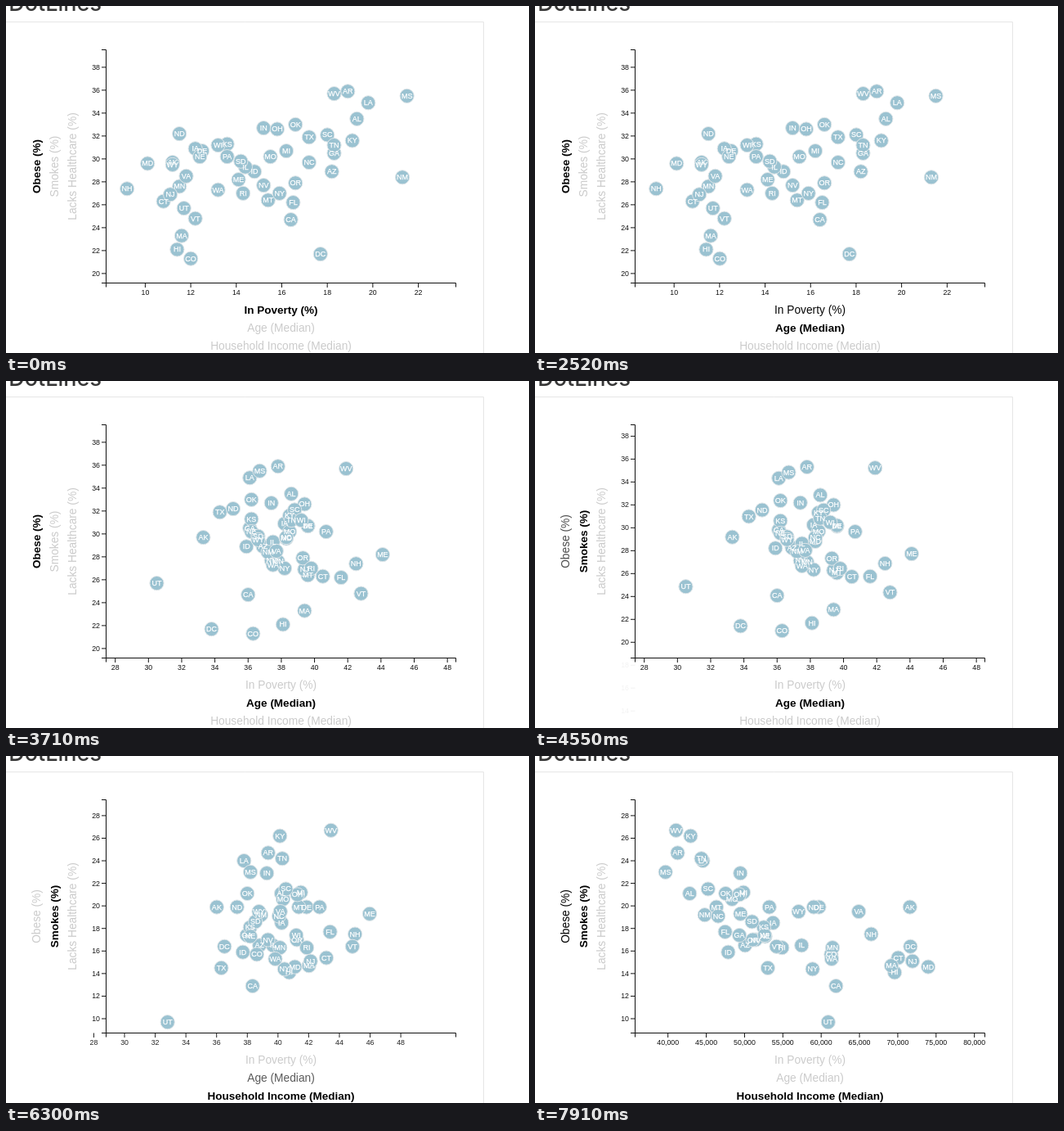
These frames come from a looping animation (640 by 424 pixels, 8 s). An HTML page with a canvas:

```html
<!DOCTYPE html>
<html lang="en">
<head>
<meta charset="utf-8">
<style>
  html, body { margin: 0; width: 100%; height: 100%; overflow: hidden; background: #fff; }
  canvas { display: block; }
</style>
</head>
<body>
<canvas id="stage" width="640" height="424"></canvas>
<script>
const ctx = document.getElementById('stage').getContext('2d');
const LOOP = 8000, TICK = 70, FADE = 300;
const LEFT = 122.5, RIGHT = 550.5, TOP = 54, BOTTOM = 338.5;
const SANS = '"Liberation Sans", Arial, sans-serif';

const states = ('AL AK AZ AR CA CO CT DE DC FL GA HI ID IL IN IA KS KY LA ME MD MA MI MN MS MO ' +
  'MT NE NV NH NJ NM NY NC ND OH OK OR PA RI SC SD TN TX UT VT VA WA WV WI WY').split(' ');

const poverty = [19.3, 11.2, 18.2, 18.9, 16.4, 12, 10.8, 12.5, 17.7, 16.5, 18.3, 11.4, 14.8, 14.4, 15.2, 12.2, 13.6,
  19.1, 19.8, 14.1, 10.1, 11.6, 16.2, 11.5, 21.5, 15.5, 15.4, 12.4, 15.2, 9.2, 11.1, 21.3, 15.9, 17.2,
  11.5, 15.8, 16.6, 16.6, 13.6, 14.3, 18, 14.2, 18.3, 17.2, 11.7, 12.2, 11.8, 13.2, 18.3, 13.2, 11.2];
const age = [38.6, 33.3, 36.9, 37.8, 36, 36.3, 40.5, 39.6, 33.8, 41.6, 36.1, 38.1, 35.9, 37.5, 37.4, 38.2, 36.2,
  38.5, 36.1, 44.1, 38.3, 39.4, 39.6, 37.8, 36.7, 38.5, 39.6, 36.2, 37.4, 42.5, 39.4, 37.2, 38.2, 38.3,
  35.1, 39.4, 36.2, 39.3, 40.7, 39.8, 38.8, 36.6, 38.6, 34.3, 30.5, 42.8, 37.7, 37.5, 41.9, 39.2, 36.6];
const income = [42830, 71583, 50068, 41262, 61933, 61303, 70048, 59716, 71648, 47463, 49321, 69592, 47861, 57444, 49446, 53712, 52504,
  42958, 44555, 49462, 73971, 69160, 49847, 61481, 39680, 48363, 46328, 52686, 51450, 66532, 71919, 44803, 58878, 46556,
  59029, 49308, 47529, 51075, 53234, 54891, 45238, 50979, 44361, 53035, 60922, 54166, 64902, 61366, 41059, 52622, 57055];
const obesity = [33.5, 29.7, 28.9, 35.9, 24.7, 21.3, 26.3, 30.7, 21.7, 26.2, 30.5, 22.1, 28.9, 29.3, 32.7, 30.9, 31.3,
  31.6, 34.9, 28.2, 29.6, 23.3, 30.7, 27.6, 35.5, 30.2, 26.4, 30.2, 27.7, 27.4, 26.9, 28.4, 27, 29.7,
  32.2, 32.6, 33, 27.9, 30.2, 27, 32.1, 29.8, 31.2, 31.9, 25.7, 24.8, 28.5, 27.3, 35.7, 31.2, 29.5];
const smokes = [21.1, 19.9, 16.5, 24.7, 12.9, 15.7, 15.4, 19.9, 16.4, 17.7, 17.4, 14.1, 15.9, 16.5, 22.9, 18.5, 18.1,
  26.2, 24, 19.3, 14.6, 14.7, 21.2, 16.3, 23, 20.6, 19.9, 17.3, 17, 17.5, 15.1, 19.2, 14.4, 19.1,
  19.9, 21, 21.1, 17, 19.9, 16.3, 21.5, 18.6, 24.2, 14.5, 9.7, 16.4, 19.5, 15.3, 26.7, 17.4, 19.5];

function makeScale(data, start, end, step) {
  const low = Math.min(...data) * 0.9, high = Math.max(...data) * 1.1;
  const ticks = [];
  for (let v = Math.ceil(low / step) * step; v <= high; v += step) ticks.push(v);
  return { data, ticks, at: v => start + (v - low) / (high - low) * (end - start) };
}
const xScales = [makeScale(poverty, LEFT, RIGHT, 2), makeScale(age, LEFT, RIGHT, 2), makeScale(income, LEFT, RIGHT, 5000)];
const yScales = [makeScale(obesity, BOTTOM, TOP, 2), makeScale(smokes, BOTTOM, TOP, 2)];
const xClicks = [2505, 6220], yClicks = [4479];

// "dark" and "light" hold the moments a label starts fading to black or to grey
const xLabels = [
  { text: 'In Poverty (%)', initial: 1, dark: [], light: [2505] },
  { text: 'Age (Median)', initial: 0, dark: [1810], light: [6220] },
  { text: 'Household Income (Median)', initial: 0, dark: [3140, 5730], light: [3430] }
];
const yLabels = [
  { text: 'Obese (%)', initial: 1, dark: [7550], light: [4479] },
  { text: 'Smokes (%)', initial: 0, dark: [3910], light: [] },
  { text: 'Lacks Healthcare (%)', initial: 0, dark: [], light: [] }
];

const clamp = v => Math.max(0, Math.min(1, v));
const lerp = (a, b, k) => a + (b - a) * k;
const cubicInOut = k => k < 0.5 ? 4 * k ** 3 : 1 - 4 * (1 - k) ** 3;

// cubic-bezier(.25, .1, .25, 1)
function cssEase(x) {
  let lo = 0, hi = 1;
  for (let i = 0; i < 16; i++) {
    const m = (lo + hi) / 2;
    if (0.75 * m * (1 - m) + m ** 3 < x) lo = m; else hi = m;
  }
  return 0.3 * lo * (1 - lo) ** 2 + 3 * lo * lo * (1 - lo) + lo ** 3;
}

function activeIndex(clicks, t) {
  return clicks.filter(c => t >= c).length;
}

function currentView(scales, clicks, t) {
  const i = activeIndex(clicks, t);
  const k = i ? cubicInOut(clamp((t - clicks[i - 1]) / FADE)) : 1;
  return { from: scales[Math.max(0, i - 1)], to: scales[i], k };
}

function place(view, i) {
  return lerp(view.from.at(view.from.data[i]), view.to.at(view.to.data[i]), view.k);
}

function eachTick({ from, to, k }, draw) {
  for (const v of new Set([...from.ticks, ...to.ticks])) {
    const wasThere = from.ticks.includes(v), stays = to.ticks.includes(v);
    ctx.globalAlpha = wasThere && stays ? 1 : stays ? k : 1 - k;
    if (ctx.globalAlpha > 0) draw(lerp(from.at(v), to.at(v), k), v.toLocaleString('en-US'));
  }
  ctx.globalAlpha = 1;
}

function polyline(color, ...points) {
  ctx.strokeStyle = color;
  ctx.lineWidth = 1;
  ctx.beginPath();
  points.forEach(p => ctx.lineTo(...p));
  ctx.stroke();
}

function write(text, x, y, font, color, align) {
  ctx.font = font;
  ctx.fillStyle = color;
  ctx.textAlign = align;
  ctx.fillText(text, x, y);
}

function drawPage() {
  ctx.fillStyle = '#fff';
  ctx.fillRect(0, 0, 640, 424);
  write('DotLines', 117, 5.5, '500 27px Inter, sans-serif', '#383838', 'right');
  polyline('#e6e6e6', [0, 19.5], [584.5, 19.5], [584.5, 424]);
}

function drawAxes(xView, yView) {
  const font = '8.8px ' + SANS;
  polyline('#111', [LEFT - 5.5, TOP - 0.5], [LEFT, TOP - 0.5], [LEFT, BOTTOM], [LEFT - 5.5, BOTTOM]);
  polyline('#111', [LEFT, BOTTOM + 5], [LEFT, BOTTOM], [RIGHT, BOTTOM], [RIGHT, BOTTOM + 5]);
  eachTick(xView, (x, text) => {
    polyline('#111', [x, BOTTOM], [x, BOTTOM + 5.5]);
    write(text, x, 353, font, '#111', 'center');
  });
  eachTick(yView, (y, text) => {
    polyline('#111', [LEFT, y], [LEFT - 5.5, y]);
    write(text, 115, y + 3, font, '#111', 'right');
  });
}

function drawLabels(labels, active, baseline, t) {
  const faded = starts => starts.reduce((sum, s) => sum + cssEase(clamp((t - s) / FADE)), 0);
  labels.forEach((label, i) => {
    const bold = i === active;
    const darkness = bold ? 1 : clamp(label.initial + faded(label.dark) - faded(label.light));
    const grey = Math.round(lerp(203, 0, darkness));
    write(label.text, 0, baseline + i * 22, (bold ? 'bold 13.5px ' : '13.75px ') + SANS,
      `rgb(${grey},${grey},${grey})`, 'center');
  });
}

function drawStates(xView, yView) {
  const spots = states.map((name, i) => [name, place(xView, i), place(yView, i)]);
  ctx.lineWidth = 1;
  ctx.fillStyle = '#9ac2d1';
  ctx.strokeStyle = '#dfe6e9';
  for (const [, x, y] of spots) {
    ctx.beginPath();
    ctx.arc(x, y, 8.6, 0, 2 * Math.PI);
    ctx.fill();
    ctx.stroke();
  }
  ctx.strokeStyle = '#fff';
  ctx.lineWidth = 0.25;
  for (const [name, x, y] of spots) {
    write(name, x, y + 3, '9px ' + SANS, '#fff', 'center');
    ctx.strokeText(name, x, y + 3);
  }
}

function draw(now) {
  const t = Math.floor(now % LOOP / TICK) * TICK;
  const xView = currentView(xScales, xClicks, t);
  const yView = currentView(yScales, yClicks, t);
  drawPage();
  drawAxes(xView, yView);
  drawStates(xView, yView);

  ctx.save();
  ctx.translate(336.5, 0);
  drawLabels(xLabels, activeIndex(xClicks, t), 376, t);
  ctx.restore();

  ctx.save();
  ctx.translate(0, 196);
  ctx.rotate(-Math.PI / 2);
  drawLabels(yLabels, activeIndex(yClicks, t), 41.5, t);
  ctx.restore();
}

const begin = performance.now();
function frame() {
  draw(performance.now() - begin);
  requestAnimationFrame(frame);
}
frame();
</script>
</body>
</html>
```
